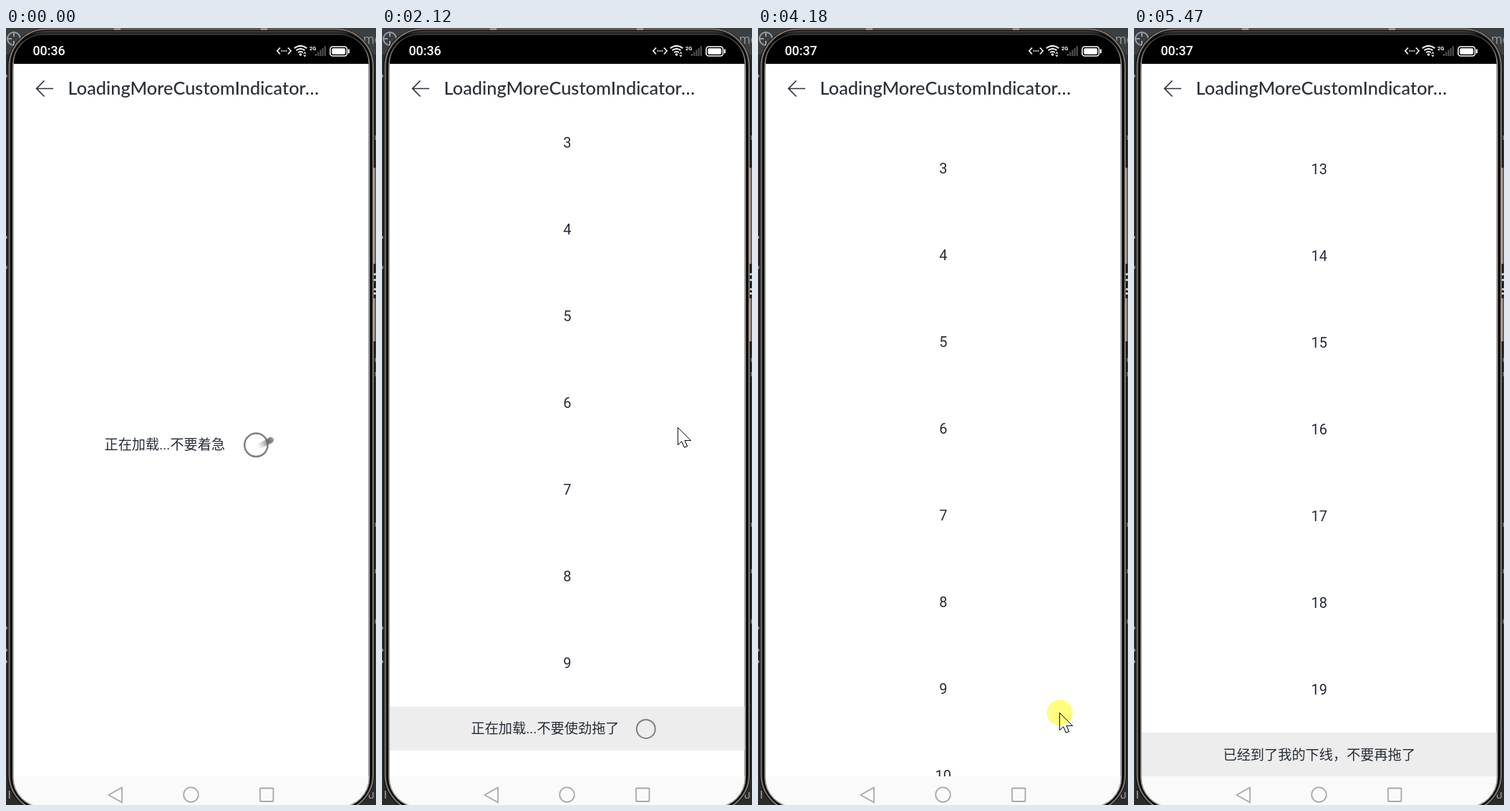
An HTML page with a canvas that plays this animation: 517 by 1084 pixels, repeating every 6.15 s.

```html
<!DOCTYPE html>
<html lang="zh-CN">
<head>
<meta charset="utf-8">
<style>
html, body { margin: 0; width: 100%; height: 100%; overflow: hidden; background: #2b2b2b; }
canvas { display: block; }
</style>
</head>
<body>
<canvas id="stage" width="517" height="1084"></canvas>
<script>
const c = document.getElementById('stage').getContext('2d');
const LOOP = 6150;
const FONT = 'Roboto, "Noto Sans CJK SC", "Noto Sans CJK", sans-serif';
const INK = '#262c38';
const TOP = 118, BOTTOM = 1044, ROW = 121, BAR = 61;
const LISTED = 1100, CLOCK = 3400, MORE = 3550;
const END1 = 345, END2 = 1555;

// time, x, y of the pointer
const POINTER = [
  [1150, 530, 10], [1180, 512, 36], [1240, 496, 300], [1370, 424, 846],
  [1410, 421, 850], [1680, 413, 557], [2150, 413, 557], [2500, 413, 856],
  [2670, 413, 856], [2900, 427, 905], [3220, 427, 940], [3500, 430, 948],
  [3850, 421, 955], [4180, 421, 955], [4270, 423, 940], [4520, 457, 732],
  [4790, 457, 732], [5440, 470, 1100]
];
const DRAG1 = [[1410, 0], [1500, 90], [1600, 250], [1680, 365], [1740, 420], [1790, 433]];
const DRAG2 = [[4180, END1], [4280, 390], [4390, 568], [4500, 1100], [4600, 1590], [4670, 1682]];

function track(keys, t, soft) {
  if (t <= keys[0][0]) return keys[0].slice(1);
  for (let i = 1; i < keys.length; i++) {
    const a = keys[i - 1], b = keys[i];
    if (t > b[0]) continue;
    let u = (t - a[0]) / (b[0] - a[0]);
    if (soft) u = u * u * (3 - 2 * u);
    return a.slice(1).map((v, j) => v + (b[j + 1] - v) * u);
  }
  return keys[keys.length - 1].slice(1);
}

// critically damped return to rest
function spring(size, ms, rate) {
  const k = rate * ms / 1000;
  return size * (1 + k) * Math.exp(-k);
}

function scrollAt(t) {
  if (t < 1790) return track(DRAG1, t)[0];
  if (t < 2660) return END1 + spring(88, t - 1790, 6);
  if (t < 4180) return END1;
  if (t < 4670) return track(DRAG2, t)[0];
  if (t < 5465) return END2 + spring(127, t - 4670, 8);
  return END2;
}

function rect(x, y, w, h, color) {
  c.fillStyle = color;
  c.fillRect(x, y, w, h);
}

function round(x, y, w, h, r, fill, stroke, width) {
  c.beginPath();
  c.roundRect(x, y, w, h, r);
  if (fill) { c.fillStyle = fill; c.fill(); }
  if (stroke) { c.strokeStyle = stroke; c.lineWidth = width; c.stroke(); }
}

function line(points, color, width, close) {
  c.beginPath();
  points.forEach(([x, y]) => c.lineTo(x, y));
  if (close) c.closePath();
  c.strokeStyle = color;
  c.lineWidth = width;
  c.stroke();
}

function ring(x, y, r, color, width, from = 0, to = 7) {
  c.beginPath();
  c.arc(x, y, r, from, to);
  c.strokeStyle = color;
  c.lineWidth = width;
  c.stroke();
}

function dot(x, y, r, color) {
  c.beginPath();
  c.arc(x, y, r, 0, 7);
  c.fillStyle = color;
  c.fill();
}

function text(s, x, y, size, color, align = 'left', weight = 400, font = FONT) {
  c.font = `${weight} ${size}px ${font}`;
  c.textAlign = align;
  c.fillStyle = color;
  c.fillText(s, x, y);
}

function backdrop() {
  rect(0, 0, 517, 1084, '#2b2b2b');
  rect(0, 0, 517, 37, '#3c3f41');
  ring(11, 15, 9, '#9a9da0', 2);
  line([[11, 5], [11, 12]], '#9a9da0', 2);
  line([[1, 15], [8, 15]], '#9a9da0', 2);
  line([[11, 18], [11, 25]], '#9a9da0', 2);
  text('me', 499, 22, 18, '#8b8f93');
  text('l', 3, 1075, 14, '#a9b0b6');
  text('U', 506, 1075, 13, '#a9b0b6');
  [65, 290, 332, 835, 866, 882].forEach(y => rect(0, y, 2, 4, '#7d8184'));
  [150, 460, 480, 690, 755, 825].forEach(y => rect(515, y, 2, 6, '#65686b'));
}

function phone() {
  round(2, 0, 513, 1096, 54, '#171514');
  round(4.5, 1.5, 508.5, 1092, 52, null, '#7d746c', 2);
  const shade = c.createLinearGradient(0, 3, 0, 11);
  shade.addColorStop(0, '#4c4a48');
  shade.addColorStop(1, '#000');
  round(7, 4, 503.5, 1087, 49, shade);
  round(10, 9, 497.5, 1078, 42, '#000');
  // bright inner rim, fading out towards the top edge
  const rim = c.createLinearGradient(0, 10, 0, 60);
  rim.addColorStop(0, '#333');
  rim.addColorStop(1, '#a5a2a0');
  round(10, 9, 497.5, 1078, 42, null, rim, 2);
  rect(151, 0, 9, 3, '#9b9088');
  rect(356, 0, 9, 3, '#9b9088');
  rect(513, 195, 4, 134, '#b3a396');
  rect(515, 195, 2, 134, '#6d625a');
  rect(513, 377, 4, 60, '#b3a396');
  rect(515, 377, 2, 60, '#6d625a');
  [342, 350, 363, 369].forEach(y => rect(514, y, 3, 3, '#c9c9c9'));
}

function status(t) {
  text(t < CLOCK ? '00:36' : '00:37', 37.5, 38, 17.8, '#fff', 'left', 500);
  line([[383, 27.5], [379, 32], [383, 36.5]], '#fff', 1.7);
  line([[394, 27.5], [398, 32], [394, 36.5]], '#fff', 1.7);
  [385.5, 388.5, 391.5].forEach(x => dot(x, 32, 1, '#fff'));
  [13, 9, 5].forEach(r => ring(411.5, 38, r, '#fff', 1.9, -2.3, -0.84));
  dot(411.5, 37, 1.8, '#fff');
  line([[416, 36], [417.5, 34], [419, 36]], '#fff', 1.2);
  line([[416, 37.5], [417.5, 39.5], [419, 37.5]], '#fff', 1.2);
  text('2G', 424, 31, 7.5, '#fff', 'left', 700);
  for (let i = 0; i < 5; i++) rect(432 + i * 3.2, 36 - i * 2.7, 2, 3 + i * 2.7, '#555');
  round(453, 26, 23.5, 13, 3.5, null, '#fff', 1.6);
  round(455.3, 28.3, 18.9, 8.4, 1.6, '#fff');
  round(478, 29.5, 2, 6, 1, '#fff');
}

function header() {
  line([[66, 84.5], [43, 84.5]], '#2b3038', 1.7);
  line([[53.5, 73.5], [42.7, 84.5], [53.5, 95.5]], '#2b3038', 1.7);
  text('LoadingMoreCustomIndicator…', 86.5, 93, 25.4, '#2b3038', 'left', 500, 'Lato, sans-serif');
}

function navbar() {
  rect(11, BOTTOM, 496, 40, '#fafafa');
  line([[143.5, 1070], [162, 1059.5], [162, 1080.5]], '#a9a9a9', 1.8, true);
  ring(258.5, 1069.7, 10.3, '#a9a9a9', 1.8);
  round(355, 1060.5, 18.5, 18.5, 1, null, '#a9a9a9', 1.8);
}

// ring with a moon on a tilted orbit
function planet(x, y, scale, phase) {
  c.save();
  c.translate(x, y);
  c.scale(scale, scale);
  ring(0, 0, 16.2, '#808080', 2.5);
  if (Math.sin(phase) < -0.3) {
    // the far half passes behind the disc
    c.beginPath();
    c.rect(-40, -40, 80, 80);
    c.arc(0, 0, 17.4, 0, Math.PI * 2);
    c.clip('evenodd');
  }
  c.rotate(-0.4);
  for (let i = 16; i >= 0; i--) {
    const p = phase - i * 0.055;
    const alpha = i ? 0.18 * (1 - i / 17) : 0.5;
    dot(-25 * Math.cos(p), 3 * Math.sin(p), 4 + 0.7 * Math.sin(p), `rgba(90,90,90,${alpha})`);
  }
  c.restore();
}

function footer(t, y) {
  rect(11, y, 496, BAR, '#ededed');
  const base = y + 37.5;
  if (t < MORE) {
    text('正在加载...不要使劲拖了', 124.5, base, 19.2, INK);
    planet(368.8, y + 31, 0.8, 3.3 + (t - 1790) * 0.0048);
  } else {
    text('已经到了我的下线，不要再拖了', 258.8, base, 19.2, INK, 'center');
  }
}

function list(t) {
  const count = t < MORE ? 10 : 20;
  const start = TOP - scrollAt(t);
  c.save();
  c.beginPath();
  c.rect(11, TOP, 496, BOTTOM - TOP);
  c.clip();
  for (let i = 0; i < count; i++) {
    const y = start + i * ROW;
    if (y > -ROW && y < BOTTOM) text(i, 258.8, y + 67.5, 20, INK, 'center');
  }
  const end = start + count * ROW;
  if (end < BOTTOM) footer(t, end);
  c.restore();
}

function pointer(t) {
  if (t < 1150 || t > 5440) return;
  const [x, y] = track(POINTER, t, true);
  const pressed = (t > 1410 && t < 1680) || (t >= 4175 && t < 4500);
  c.save();
  c.translate(x + 0.5, y + 0.5);
  c.fillStyle = '#fff';
  line([[0, 0], [0, 24], [5.2, 19.2], [9, 27.5], [13, 26], [9.5, 18], [18, 18]], '#111', 1, true);
  c.fill();
  c.stroke();
  if (pressed) {
    // highlight tints the pointer as well
    c.globalCompositeOperation = 'multiply';
    dot(0, 0, 18, '#fffc80');
  }
  c.restore();
}

function draw(t) {
  backdrop();
  phone();
  c.save();
  c.beginPath();
  c.roundRect(11, 10, 495.5, 1076, 40);
  c.clip();
  rect(11, 10, 496, 40, '#000');
  rect(11, 50, 496, 1034, '#fff');
  status(t);
  header();
  if (t < LISTED) {
    text('正在加载...不要着急', 137.5, 588, 19.2, INK);
    planet(349.5, 581.8, 1, 2.6 + t * 2 * Math.PI / 1200);
  } else {
    list(t);
  }
  navbar();
  c.restore();
  pointer(t);
}

const began = performance.now();
function tick() {
  draw((performance.now() - began) % LOOP);
  requestAnimationFrame(tick);
}
tick();
</script>
</body>
</html>
```
